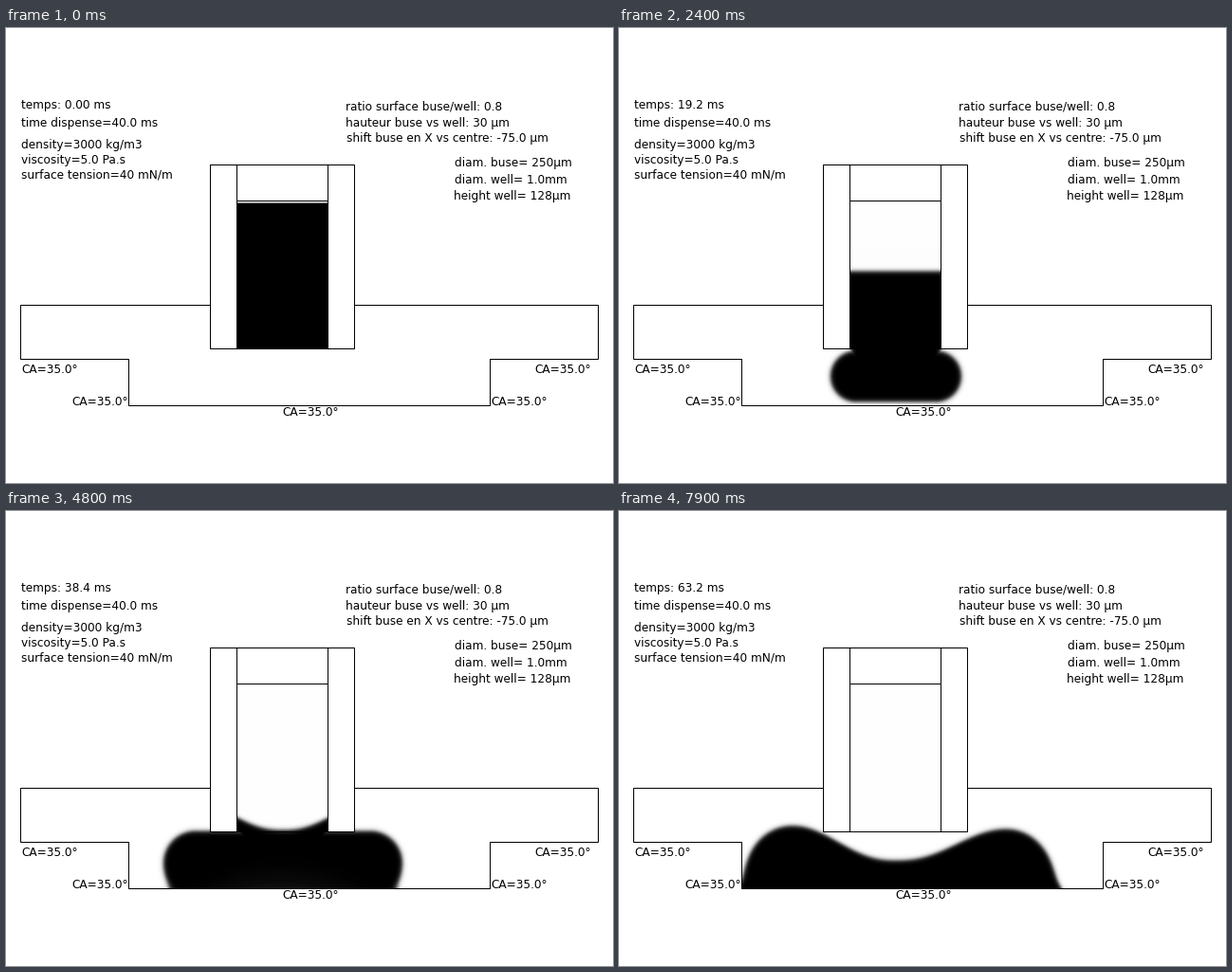
Recreate the animation shown at these times as a matplotlib script. Size 640 by 480 pixels, loop 8000 ms.

```python
import numpy as np
import matplotlib.pyplot as plt
from matplotlib.animation import FuncAnimation
from matplotlib.patches import Rectangle

W, H, DPI = 640, 480, 64
FRAMES, STEP = 80, 100
PX = 72 / DPI
CX, HALF = 291.5, 47.5          # nozzle axis and inner half width
TIP, FLOOR, WALL = 338, 398, 130

plt.rcParams.update({"font.family": "DejaVu Sans", "font.size": 12.15 * PX})

# Key poses of the liquid
TIMES = [0, 900, 1800, 2400, 4800, 5800, 7900]
REACH = [47.5, 47.5, 54, 69, 126, 146, 163]     # half width of the drop
RIM = [34, 34, 26, 27, 34, 40, 47]              # radius of its round rim
RIM_Y = [338, 338, 362, 367, 371, 372, 382]     # height of the rim's centre
LEVEL = [184, 209, 237, 256, 336, 361, 368]     # upper surface on the axis
FOOT = [0, 0, 0, 0, 3, 4, 14]                   # flare along the floor

X, Y = np.meshgrid(np.arange(WALL, 510), np.arange(182, FLOOR + 1))
DX = abs(X - CX)
ON_LEFT = X < CX
IN_TUBE = (DX <= HALF + 1) & (Y < TIP)


def ramp(t, a, b):
    return np.clip((t - a) / (b - a), 0, 1)


def fluid(t):
    reach, r, yc, level, foot = (
        np.interp(t, TIMES, v) for v in (REACH, RIM, RIM_Y, LEVEL, FOOT))
    sigma = 0.5 + 1.8 * ramp(t, 0, 500)

    # the left side stays narrower and higher at the end
    lag = ramp(t, 5800, 7900) * ON_LEFT
    reach, yc = reach - 7 * lag, yc - 3.5 * lag
    core = reach - r

    # capsule: flattened while it emerges, spread out once it wets the floor
    dy = (Y - yc) / max(ramp(t, 0, 900), 0.01)
    dy = np.where(dy > 0, dy * (1 - 0.15 * ramp(t, 2500, 3200)), dy)
    flare = foot * np.exp((Y - FLOOR) / (foot + 1))
    body = r - np.hypot(np.maximum(DX - flare - core, 0), dy)
    body = np.maximum(body, np.minimum(HALF - DX, yc - Y))

    # upper surface: a cosine dip between the two crests
    rise = np.maximum(28 * ramp(t, 3300, 4800), level - (yc - r))
    rise = rise * ramp(t, 3200, 3600)
    swell = (1 - np.cos(np.pi * np.minimum(DX / core, 1))) / 2
    depth = Y - level + rise * swell ** 1.2

    d = np.where(IN_TUBE, depth, np.minimum(body, depth))
    f = 0.5 + 0.5 * np.tanh(0.85 * d / sigma)
    haze = 0.05 * ramp(t, 0, 500) * np.exp(-t / 1500 + np.minimum(depth, 0) / 14)
    f = np.maximum(f, (haze + 0.006) * IN_TUBE)

    # air trapped on the floor, and the pale zone it leaves
    air = 0.9 * np.exp(-((t - 3400) / 420) ** 2)
    for bx in (-24.5, 0, 24.5):
        f *= 1 - air * np.exp(-((X - CX - bx) ** 2 + (Y - 395) ** 2) / 18)
    pale = 0.08 * np.exp(-((t - 4300) / 1100) ** 2)
    return f * (1 - pale * np.exp((Y - FLOOR) / 16 - (DX / 70) ** 2))


fig = plt.figure(figsize=(W / DPI, H / DPI), dpi=DPI, facecolor="white")
ax = fig.add_axes([0, 0, 1, 1])
ax.set_xlim(0, W)
ax.set_ylim(H, 0)
ax.axis("off")

img = ax.imshow(fluid(0), cmap="gray_r", vmin=0, vmax=1,
                extent=(WALL, 510, FLOOR + 1, 182),
                interpolation="nearest", aspect="auto", zorder=1)


def line(*pts):
    ax.plot(*zip(*pts), color="black", lw=PX, zorder=3,
            solid_joinstyle="miter", solid_capstyle="projecting")


for x0, x1 in ((215, 243), (339, 367)):
    ax.add_patch(Rectangle((x0, 144), x1 - x0, TIP - 144, fc="white", ec="none", zorder=2))
line((215, 292), (15, 292), (15, 349), (129, 349), (129, FLOOR),
     (510, FLOOR), (510, 349), (624, 349), (624, 292), (367, 292))
line((215, 144), (367, 144), (367, TIP), (215, TIP), (215, 144))
line((243, 144), (243, TIP))
line((339, 144), (339, TIP))
line((243, 182), (339, 182))


def label(x, y, s):
    return ax.text(x, y, s, color="black", va="baseline", ha="left", zorder=4)


clock = label(16, 85, "")
for x, y, s in (
    (16, 104, "time dispense=40.0 ms"),
    (16, 127, "density=3000 kg/m3"),
    (16, 143, "viscosity=5.0 Pa.s"),
    (16, 159, "surface tension=40 mN/m"),
    (358, 86, "ratio surface buse/well: 0.8"),
    (358, 104, "hauteur buse vs well: 30 µm"),
    (359, 120, "shift buse en X vs centre: -75.0 µm"),
    (473, 146, "diam. buse= 250µm"),
    (473, 164, "diam. well= 1.0mm"),
    (472, 181, "height well= 128µm"),
):
    label(x, y, s)
for x, y in ((16, 364), (557, 364), (69, 398), (511, 398), (291, 409)):
    label(x, y, "CA=35.0°")


def draw(i):
    img.set_data(fluid(i * STEP))
    clock.set_text(f"temps: {f'{0.8 * i:.3f}'[:4]} ms")
    return img, clock


anim = FuncAnimation(fig, draw, frames=FRAMES, interval=STEP, repeat=True)
plt.show()
```
